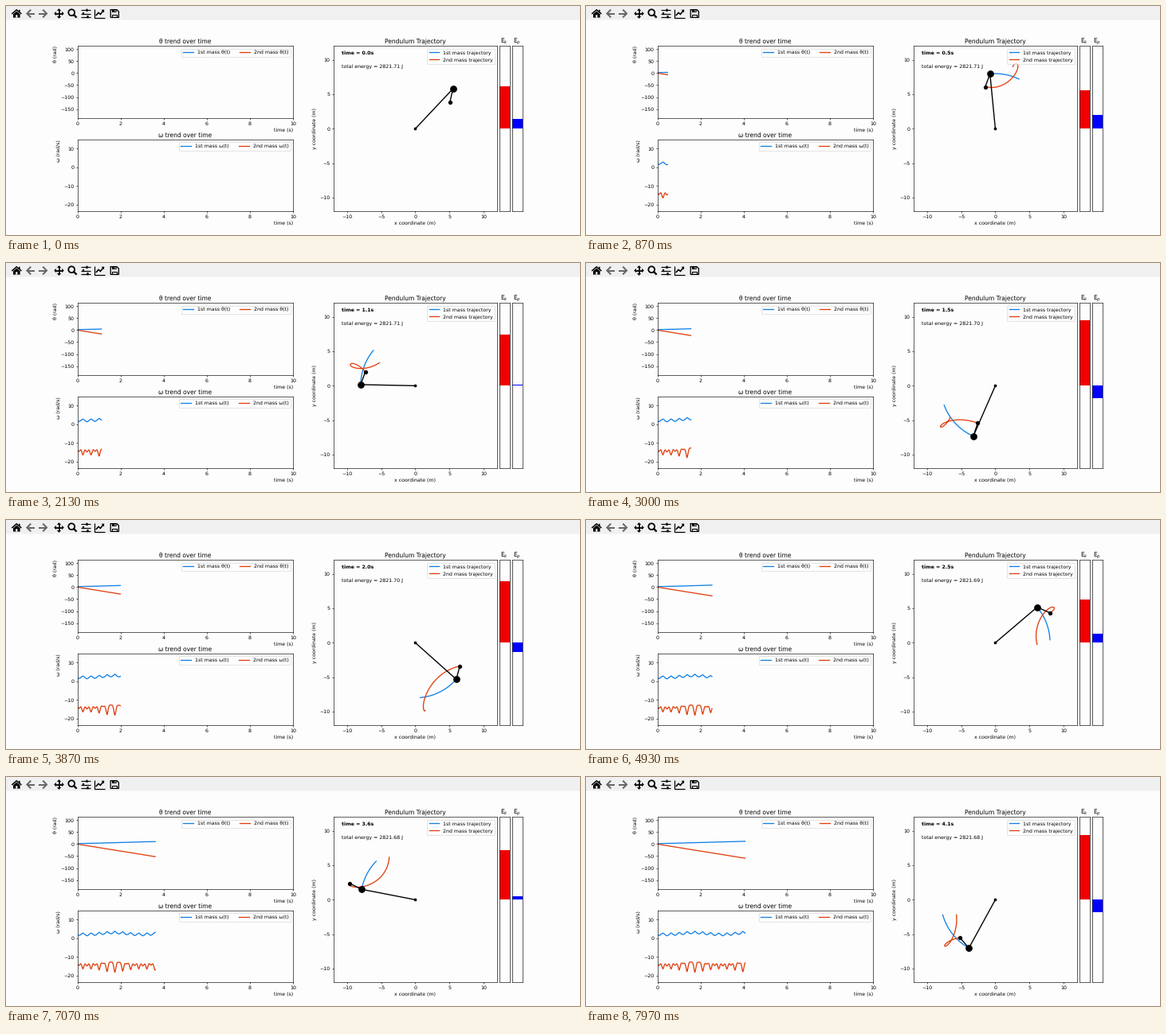
Animation, 720 px wide and 288 px high, one loop 8 s. Source, as a matplotlib script:

```python
import math

import numpy as np
import matplotlib.pyplot as plt
from matplotlib.animation import FuncAnimation
from matplotlib.patches import Circle, Polygon, Rectangle

W, H, DPI = 720, 288, 45
PT = 72 / DPI
BG = "#fdfdfe"
BLUE, RED = "#1180e6", "#e0400f"

plt.rcParams.update({
    "font.family": "DejaVu Sans",
    "font.size": 10,
    "text.hinting": "none",
    "axes.facecolor": BG,
    "axes.linewidth": 1.0,
    "xtick.major.width": 1.0,
    "ytick.major.width": 1.0,
    "lines.linewidth": 2.1,
})

# double pendulum
G, M1, M2, L1, L2 = 9.81, 8.0, 2.0, 8.0, 2.0
START = tuple(math.radians(v) for v in (135, 0, 100, -800))
DT, T_END = 0.001, 4.2
T0, STEP, TRAIL = 0.0165, 0.0169, 0.266
STEPS, FRAMES, INTERVAL = 240, 250, 32


def deriv(s):
    a, b, wa, wb = s
    d = a - b
    sd, cd = math.sin(d), math.cos(d)
    den = 2 * M1 + M2 - M2 * math.cos(2 * d)
    acc_a = (-G * (2 * M1 + M2) * math.sin(a) - M2 * G * math.sin(a - 2 * b)
             - 2 * sd * M2 * (wb * wb * L2 + wa * wa * L1 * cd)) / (L1 * den)
    acc_b = 2 * sd * (wa * wa * L1 * (M1 + M2) + G * (M1 + M2) * math.cos(a)
                      + wb * wb * L2 * M2 * cd) / (L2 * den)
    return wa, wb, acc_a, acc_b


def shift(s, k, h):
    return tuple(x + h * v for x, v in zip(s, k))


def rk4(s):
    k1 = deriv(s)
    k2 = deriv(shift(s, k1, DT / 2))
    k3 = deriv(shift(s, k2, DT / 2))
    k4 = deriv(shift(s, k3, DT))
    return tuple(x + DT / 6 * (p + 2 * q + 2 * r + u)
                 for x, p, q, r, u in zip(s, k1, k2, k3, k4))


states = [START]
for _ in range(int(T_END / DT)):
    states.append(rk4(states[-1]))
th1, th2, om1, om2 = np.array(states).T
ts = np.arange(len(th1)) * DT
x1, y1 = L1 * np.sin(th1), -L1 * np.cos(th1)
x2, y2 = x1 + L2 * np.sin(th2), y1 - L2 * np.cos(th2)
pot = G * (M1 * y1 + M2 * y2)
kin = (0.5 * (M1 + M2) * (L1 * om1) ** 2 + 0.5 * M2 * (L2 * om2) ** 2
       + M2 * L1 * L2 * om1 * om2 * np.cos(th1 - th2))

fig = plt.figure(figsize=(W / DPI, H / DPI), dpi=DPI, facecolor=BG)


def panel(left, top, right, bottom):
    return fig.add_axes([left / W, 1 - bottom / H, (right - left) / W, (bottom - top) / H])


def trend(top, bottom, sym, unit, ylim, ticks):
    ax = panel(90, top, 360, bottom)
    ax.set(xlim=(0, 10), ylim=ylim, yticks=ticks)
    ax.set_title(f"{sym} trend over time")
    ax.set_xlabel("time (s)", loc="right")
    ax.set_ylabel(f"{sym} ({unit})", loc="top")
    lines = [ax.plot([], [], color=c, label=f"{n} mass {sym}(t)")[0]
             for c, n in ((BLUE, "1st"), (RED, "2nd"))]
    ax.legend(loc="upper right", ncol=2)
    return lines


def gauge(left, right, sub, color):
    ax = panel(left, 50.4, right, 258.3)
    ax.set(xlim=(0, 1), ylim=(-4444, 4444), xticks=[], yticks=[])
    ax.set_title(f"E$_{sub}$", y=1.0)
    return ax.add_patch(Rectangle((0, 0), 1, 0, fc=color, lw=0))


th_lines = trend(50.4, 140.6, "θ", "rad", (-186.7, 113.3), range(-150, 101, 50))
om_lines = trend(168.2, 258.3, "ω", "rad/s", (-23.6, 14.7), range(-20, 11, 10))

ax = panel(410.5, 50.4, 616.4, 258.3)
ax.set(xlim=(-12, 12), ylim=(-12, 12), xticks=range(-10, 11, 5), yticks=range(-10, 11, 5),
       title="Pendulum Trajectory", xlabel="x coordinate (m)", ylabel="y coordinate (m)")
trails = [ax.plot([], [], color=c, label=f"{n} mass trajectory")[0]
          for c, n in ((BLUE, "1st"), (RED, "2nd"))]
rod, = ax.plot([], [], color="black", lw=2.2)
balls = [ax.plot([], [], "o", color="black", ms=size, mew=0)[0] for size in (6, 14, 8.5)]
ax.legend(loc="upper right")
clock = ax.text(0.05, 0.95, "", weight="bold", transform=ax.transAxes)
energy = ax.text(0.05, 0.87, "", transform=ax.transAxes)

kin_bar = gauge(618.5, 631.8, "k", "#f00000")
pot_bar = gauge(634.5, 647.9, "p", "#0000ff")

# window toolbar, in pixels from the top left
bar = fig.add_axes([0, 0, 1, 1], facecolor="none")
bar.set(xlim=(0, W), ylim=(H, 0))
bar.axis("off")


def stroke(pts, lw=1.8, color="black"):
    bar.plot(*zip(*pts), color=color, lw=lw * PT, solid_capstyle="butt",
             solid_joinstyle="miter")


def fill(pts, color="black"):
    bar.add_patch(Polygon(pts, fc=color, lw=0))


def box(x, y, w, h, color="black"):
    bar.add_patch(Rectangle((x, y), w, h, fc=color, lw=0, snap=False))


GREY, TOOL = "#666666", "#f0f0f0"
box(0, 0, W, 17.5, TOOL)

stroke([(7.2, 10), (13.3, 4.8), (19.4, 10)], 1.5)
fill([(9, 10.2), (13.3, 6.6), (17.6, 10.2), (17.6, 14.6), (9, 14.6)])
box(12.2, 11.2, 2.2, 3.4, TOOL)
box(16, 4.8, 1.6, 3)

for tip, way in ((25.4, 1), (52, -1)):
    stroke([(tip + way, 9.5), (tip + 10.6 * way, 9.5)], 2, GREY)
    stroke([(tip + 5.8 * way, 4.6), (tip + way, 9.5), (tip + 5.8 * way, 14.4)], 2, GREY)

stroke([(62, 9.5), (71, 9.5)], 1.8)
stroke([(66.5, 5), (66.5, 14)], 1.8)
for dx, dy in ((1, 0), (-1, 0), (0, 1), (0, -1)):
    fill([(66.5 + u * dx - v * dy, 9.5 + u * dy + v * dx)
          for u, v in ((6.3, 0), (3.6, 2.7), (3.6, -2.7))])

bar.add_patch(Circle((82.2, 8.2), 3.9, fc="none", ec="black", lw=1.8 * PT))
stroke([(84.9, 10.9), (88.6, 14.6)], 2.3)

for y, knob in ((5.3, 101.5), (9.5, 97), (13.7, 102.5)):
    stroke([(94, y), (106, y)], 1.2)
    box(knob - 1.1, y - 1.6, 2.2, 3.2)

stroke([(111.2, 4), (111.2, 14.5), (123.6, 14.5)], 1.2)
stroke([(112.8, 12), (116, 8.4), (118.4, 10.4), (121.8, 6.2)], 1.6)
fill([(119.6, 4.8), (123.2, 4.6), (123, 8.4)])

stroke([(131.2, 4.6), (139, 4.6), (141.4, 7), (141.4, 14.4), (131.2, 14.4), (131.2, 4)], 1.3)
box(133, 4.4, 5.6, 3.6)
box(136.2, 5.2, 1.3, 2, TOOL)
stroke([(133.4, 14), (133.4, 10.8), (139.2, 10.8), (139.2, 14)], 1.1)


def update(frame):
    step = min(STEPS - 1, round((frame + 0.5) * STEPS / FRAMES))
    t = T0 + STEP * step
    k = round(t / DT)
    past = slice(round(T0 / DT), k + 1)
    recent = slice(round(max(T0, t - TRAIL) / DT), k + 1)
    for line, data in zip(th_lines + om_lines, (th1, th2, om1, om2)):
        line.set_data(ts[past], data[past])
    for line, x, y in zip(trails, (x1, x2), (y1, y2)):
        line.set_data(x[recent], y[recent])
    joints = ((0, 0), (x1[k], y1[k]), (x2[k], y2[k]))
    rod.set_data(*zip(*joints))
    for ball, (x, y) in zip(balls, joints):
        ball.set_data([x], [y])
    kin_bar.set_height(kin[k])
    pot_bar.set_height(pot[k])
    clock.set_text(f"time = {t:.1f}s")
    energy.set_text(f"total energy = {2821.7145 - 0.0083 * t:.2f} J")
    return [*th_lines, *om_lines, *trails, rod, *balls, kin_bar, pot_bar, clock, energy]


anim = FuncAnimation(fig, update, frames=FRAMES, interval=INTERVAL, repeat=True, blit=False)
plt.show()
```
